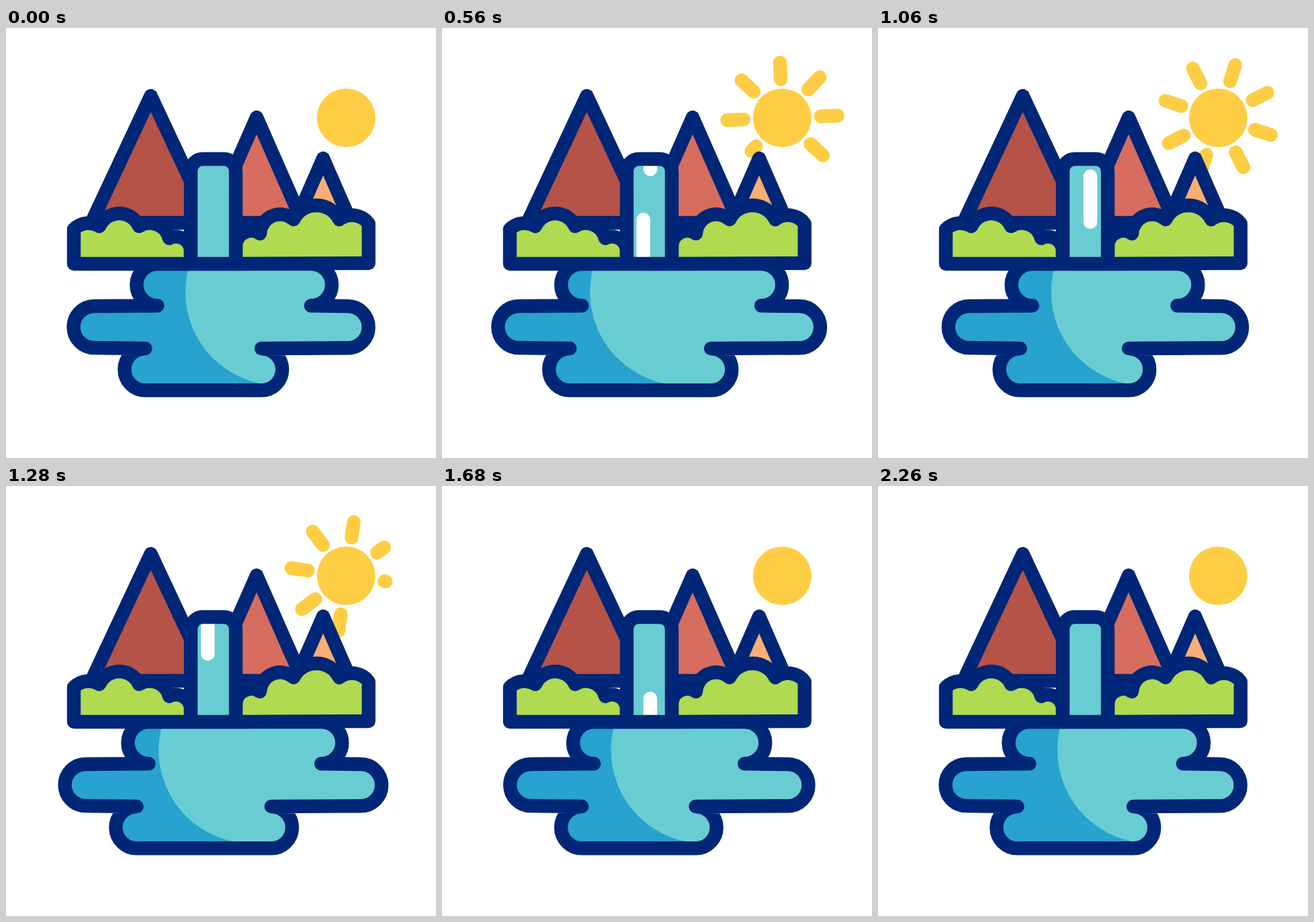
An HTML page for the animation above (2400 ms loop, 640 by 640 pixels).

```html
<!DOCTYPE html>
<html lang="en">
<head>
<meta charset="utf-8">
<title>Waterfall</title>
<style>
  html, body { margin: 0; width: 100%; height: 100%; overflow: hidden; background: #fff; }
  svg { display: block; width: 100%; height: 100%; }
  .ink { stroke: #002677; stroke-width: 20.4; stroke-linejoin: round; stroke-linecap: round; }
  .ray { stroke: #ffcd44; stroke-width: 20.4; stroke-linecap: round; }
  .drop { stroke: #fff; stroke-width: 20.4; stroke-linecap: round; }
</style>
</head>
<body>
<svg viewBox="0 0 640 640">
  <defs>
    <clipPath id="lakeClip"><path class="shore"/></clipPath>
    <clipPath id="fallClip"><path d="M275 351V213A18 18 0 0 1 293 195H324A18 18 0 0 1 342 213V351Z"/></clipPath>
    <clipPath id="spout"><rect x="284" y="205" width="49" height="146"/></clipPath>
  </defs>

  <g id="rays"></g>
  <circle cx="506.3" cy="133.8" r="43.5" fill="#ffcd44"/>

  <g class="ink">
    <path fill="#b55348" d="M215.500 101L127 290H304Z"/>
    <path fill="#d66d5f" d="M373 133L304 290H442Z"/>
    <path fill="#f9ae73" d="M472 194L434.500 280H509.500Z"/>
  </g>

  <path class="shore" fill="#28a2ce"/>
  <g clip-path="url(#lakeClip)">
    <path id="shine" fill="#68cdd2" d="M406 254A139 139 0 0 0 406 532V560H720V254Z"/>
  </g>
  <path class="shore ink" fill="none"/>

  <g class="ink" fill="#b0da50">
    <path d="M101 351V299.500A31 31 0 0 1 139 295A32.400 32.400 0 0 1 198 295A30 30 0 0 1 243 313A22 22 0 0 1 275 331V351Z"/>
    <path d="M342 351V325A23 23 0 0 1 378 306A30 30 0 0 1 428 285A38 38 0 0 1 496 285A31 31 0 0 1 539.700 291V350Z"/>
  </g>

  <g clip-path="url(#fallClip)">
    <rect x="270" y="190" width="80" height="165" fill="#68cdd2"/>
    <g id="drops" clip-path="url(#spout)"></g>
  </g>
  <path class="ink" fill="none" d="M275 351V213A18 18 0 0 1 293 195H324A18 18 0 0 1 342 213V351Z"/>
</svg>

<script>
const LOOP = 2400;
const SUN = { x: 506.3, y: 133.8, inner: 57.5, length: 25 };
const SPEED = 0.6;

// x, length, time at which the lower end is at y = 195
const DROPS = [
  [316.500, 88, 83], [299.700, 88, 280], [310, 138, 518],
  [316, 88, 887], [300.300, 88, 1172], [310, 88, 1348]
];

const ease = p => (1 - Math.cos(Math.PI * Math.min(1, Math.max(0, p)))) / 2;

// Eased value between [time, value] keys
function track(keys, t) {
  const i = keys.findIndex(k => k[0] > t);
  if (i < 0) return keys[keys.length - 1][1];
  if (i === 0) return keys[0][1];
  const [t0, a] = keys[i - 1], [t1, b] = keys[i];
  return a + (b - a) * ease((t - t0) / (t1 - t0));
}

// Out, in, out, in and back to rest
const swell = (out, back) =>
  [[0, 0], [633, out], [1000, back], [1400, out], [1800, back], [2260, 0]];

const LEFT = swell(-17.7, 5.5);
const TOP = swell(21.9, -10.3);
const MID = swell(24.2, 1.1);
const LOW = swell(20.8, -8.5);
const SHINE = swell(-48.4, -7);
const TURN = [[0, 43.5], [950, -21], [1290, -8], [1660, -20]];

function addLines(id, name, count) {
  const parent = document.getElementById(id);
  return Array.from({ length: count }, () => {
    const line = document.createElementNS("http://www.w3.org/2000/svg", "line");
    line.setAttribute("class", name);
    return parent.appendChild(line);
  });
}

function setLine(el, x1, y1, x2, y2, shown) {
  el.style.display = shown ? "" : "none";
  Object.entries({ x1, y1, x2, y2 }).forEach(([k, v]) => el.setAttribute(k, v));
}

const rays = addLines("rays", "ray", 8);
const drops = addLines("drops", "drop", DROPS.length);
const shores = document.querySelectorAll(".shore");
const shine = document.getElementById("shine");

function lakePath(t) {
  const left = track(LEFT, t), top = track(TOP, t), mid = track(MID, t), low = track(LOW, t);
  const arc = (x, y, sweep) => `A31 31 0 0 ${sweep} ${x} ${y}`;
  return `M${225.500 + left} 351` + arc(225.500 + left, 413.3, 0) +
    `L${131.500 + left} 414` + arc(131.500 + left, 476, 0) +
    `L${207.500 + left} 477` + arc(207.500 + left, 539.3, 0) +
    `H${380 + low}` + arc(380 + low, 477, 0) +
    `L${508.500 + mid} 476.300` + arc(508.500 + mid, 414, 0) +
    `L${453.800 + top} 413.300` + arc(453.800 + top, 351, 0) + "Z";
}

function drawRays(t) {
  const turn = track(TURN, t);
  rays.forEach((el, i) => {
    const size = ease((t - 110 - 65 * i) / 140) - ease((t - 1122 - 45 * i) / 140);
    const a = (turn + 45 * (i - 1)) * Math.PI / 180;
    const at = r => [SUN.x + r * Math.cos(a), SUN.y - r * Math.sin(a)];
    setLine(el, ...at(SUN.inner), ...at(SUN.inner + SUN.length * size), size > 0.001);
  });
}

function drawDrops(t) {
  drops.forEach((el, i) => {
    const [x, length, start] = DROPS[i];
    const end = 195 + (t - start) * SPEED;
    setLine(el, x, end - length + 10, x, end - 10, end > 195 && end - length < 360);
  });
}

function draw(now) {
  const t = now % LOOP;
  const d = lakePath(t);
  shores.forEach(el => el.setAttribute("d", d));
  shine.setAttribute("transform", `translate(${track(SHINE, t)} 0)`);
  drawRays(t);
  drawDrops(t);
}

let begin;
function tick(now) {
  begin ??= now;
  draw(now - begin);
  requestAnimationFrame(tick);
}
draw(0);
requestAnimationFrame(tick);
</script>
</body>
</html>
```
